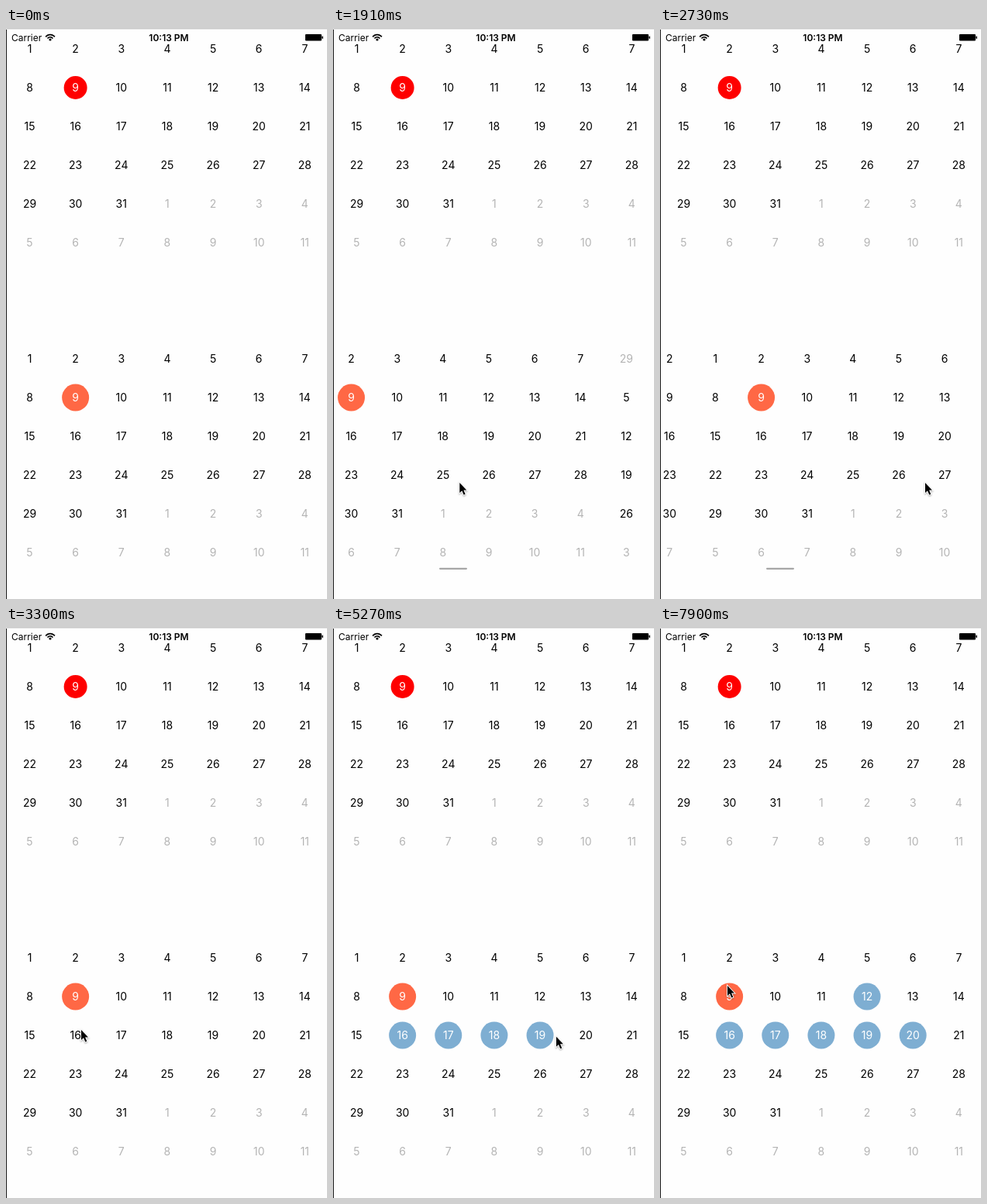
An HTML page with a canvas that plays this animation: 414x737 px, repeating every 8 s.

```html
<!DOCTYPE html>
<html lang="en">
<head>
<meta charset="utf-8">
<title>Calendar</title>
<style>
  html, body { margin: 0; width: 100%; height: 100%; overflow: hidden; background: #fefefe; }
  canvas { display: block; }
</style>
</head>
<body>
<canvas id="stage" width="414" height="737"></canvas>
<script>
const ctx = document.getElementById('stage').getContext('2d');
const LOOP = 8000, WIDTH = 414, COL = 59.14, ROW = 50;
const FONT = 'Inter, "Liberation Sans", sans-serif';
const TOMATO = '#ff6845', BLUE = '#7eaed2';
const ENTER = 1250, GRAB = 1490, RELEASE = 2640, SETTLED = 2990;
const TAP_DELAY = 150;

// first: column of day 1, prev: length of the month before
const sep = { first: 5, days: 30, prev: 31 };
const oct = { first: 0, days: 31, prev: 30 };
const nov = { first: 3, days: 30, prev: 31 };

// pointer moves; a day is tapped shortly after arrival
const moves = [
  { from: ENTER, to: 1460, x: 234, y: 590 },
  { from: GRAB, to: 1766, x: 135, y: 587 },
  { from: 1766, to: 2390, x: 342, y: 587 },
  { from: 2800, to: 3300, x: 97, y: 520, day: 16 },
  { from: 3520, to: 3720, x: 150, y: 528, day: 17 },
  { from: 4020, to: 4240, x: 198, y: 531, day: 18 },
  { from: 4460, to: 4690, x: 256, y: 532, day: 19 },
  { from: 5060, to: 5500, x: 324, y: 525, day: 20 },
  { from: 6690, to: 7090, x: 264, y: 487, day: 12 },
  { from: 7390, to: 7890, x: 87, y: 463 }
];

const clamp = v => Math.max(0, Math.min(1, v));
const ramp = (t, a, b) => clamp((t - a) / (b - a));
const smooth = k => k * k * (3 - 2 * k);

function pointer(t) {
  let x = 300, y = -20;
  for (const m of moves) {
    const k = smooth(ramp(t, m.from, m.to));
    x += (m.x - x) * k;
    y += (m.y - y) * k;
  }
  return { x, y };
}

function scroll(t) {
  if (t < GRAB) return 0;
  const drag = pointer(Math.min(t, RELEASE)).x - 234;
  return drag * 0.935 * (1 - ramp(t, RELEASE, SETTLED)) ** 3;
}

// tapped circles grow past full size, then settle
const pop = age => age < 188 ? 0.3 + 0.9 * age / 188 : 1.2 - 0.2 * ramp(age, 188, 250);

function disc(x, y, r, color) {
  ctx.fillStyle = color;
  ctx.beginPath();
  ctx.arc(x, y, r, 0, 7);
  ctx.fill();
}

function pill(x, y, w, h, r, color) {
  ctx.fillStyle = color;
  ctx.beginPath();
  ctx.roundRect(x, y, w, h, r);
  ctx.fill();
}

function label(text, x, y, color, font, align = 'center') {
  ctx.font = `${font} ${FONT}`;
  ctx.textAlign = align;
  ctx.fillStyle = color;
  ctx.fillText(text, x, y);
}

// mark(day) gives the radius and colour of the circle behind a day, if any
function grid(month, left, top, mark = () => null) {
  for (let i = 0; i < 42; i++) {
    const x = left + 30.5 + (i % 7) * COL, y = top + Math.floor(i / 7) * ROW;
    const n = i - month.first;
    const inside = n >= 0 && n < month.days;
    const day = n < 0 ? month.prev + n + 1 : n % month.days + 1;
    const spot = inside && mark(day);
    if (spot) disc(x, y, ...spot);
    label(day, x, y + 5, spot ? '#fff' : inside ? '#000' : '#b4b4b4', '14px');
  }
}

function statusBar() {
  label('Carrier', 7, 17, '#000', '12px', 'left');
  label('10:13 PM', 210, 17, '#000', '600 12px');
  ctx.strokeStyle = '#000';
  ctx.lineWidth = 1.7;
  for (const r of [4.6, 7.8]) {
    ctx.beginPath();
    ctx.arc(57, 16.5, r, -Math.PI * 0.77, -Math.PI * 0.23);
    ctx.stroke();
  }
  disc(57, 15, 1.6, '#000');
  pill(386, 8, 21, 8.5, 1, '#000');
  pill(407.5, 10.5, 1.5, 3.5, 0.7, '#000');
}

function indicator(t) {
  ctx.globalAlpha = ramp(t, GRAB, GRAB + 50) * (1 - ramp(t, 3000, 3250));
  pill(137, 696.7, 36, 2.2, 1.1, '#a6a6a6');
  ctx.globalAlpha = 1;
}

const arrow = new Path2D('M0 0V13L3 10.3L5.3 15.6L7.3 14.7L5.1 9.6H9Z');
function cursor({ x, y }) {
  ctx.save();
  ctx.translate(x, y);
  ctx.shadowColor = 'rgba(0,0,0,.35)';
  ctx.shadowBlur = 2;
  ctx.shadowOffsetY = 1;
  ctx.strokeStyle = '#fff';
  ctx.lineWidth = 1.8;
  ctx.stroke(arrow);
  ctx.shadowColor = 'transparent';
  ctx.fillStyle = '#000';
  ctx.fill(arrow);
  ctx.restore();
}

function draw(t) {
  ctx.fillStyle = '#fefefe';
  ctx.fillRect(0, 0, WIDTH, 737);

  grid(oct, 0, 27, day => day === 9 && [15, '#fe0000']);

  const shift = scroll(t);
  grid(sep, shift - WIDTH, 427);
  grid(nov, shift + WIDTH, 427);
  grid(oct, shift, 427, day => {
    if (day === 9) return [17.5, TOMATO];
    const tap = moves.find(m => m.day === day);
    const age = tap ? t - tap.to - TAP_DELAY : -1;
    return age >= 0 && [17.5 * pop(age), BLUE];
  });

  indicator(t);
  statusBar();
  ctx.fillStyle = '#c9c9c9';
  ctx.fillRect(0, 0, WIDTH, 1.5);
  ctx.fillStyle = '#1a1a1a';
  ctx.fillRect(0, 2, 1, 735);

  if (t > ENTER) cursor(pointer(t));
}

const start = performance.now();
function tick() {
  draw((performance.now() - start) % LOOP);
  requestAnimationFrame(tick);
}
tick();
</script>
</body>
</html>
```
